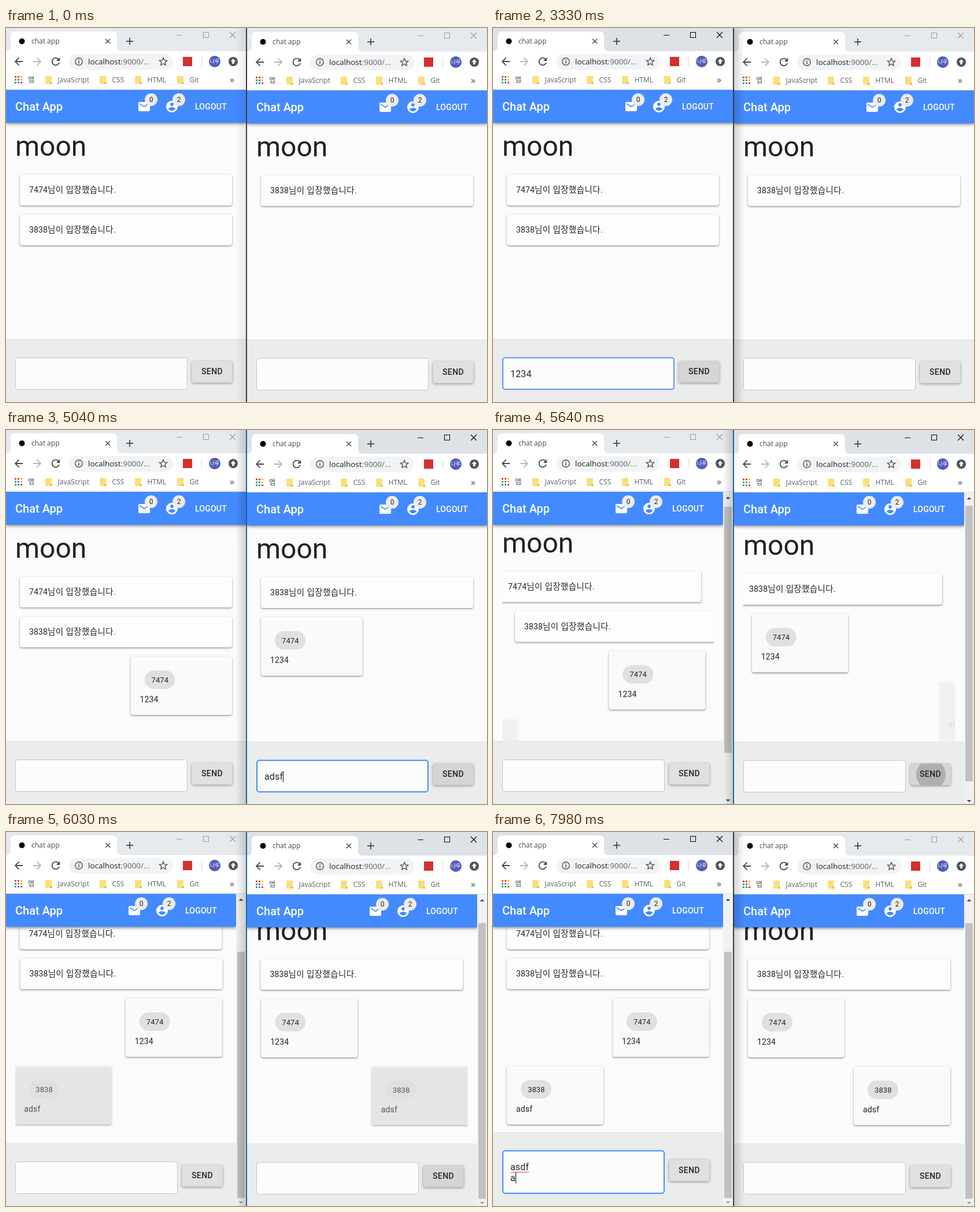
These frames come from a looping animation (832 px wide and 647 px high, 8000 ms). An HTML page with a canvas:

```html
<!DOCTYPE html>
<html lang="ko">
<head>
<meta charset="utf-8">
<title>chat app</title>
<style>
html, body { margin: 0; width: 100%; height: 100%; overflow: hidden; background: #fbfbfb; }
canvas { display: block; width: 832px; height: 647px; }
</style>
</head>
<body>
<canvas id="stage" width="832" height="647"></canvas>
<script>
const ctx = document.getElementById('stage').getContext('2d');
const LOOP = 8000;
const WIN_W = 415, BOTTOM = 647;
const UI = '"Open Sans", "Noto Sans CJK KR", "Noto Sans CJK JP", "Noto Sans CJK", sans-serif';
const APP = 'Roboto, "Noto Sans CJK KR", "Noto Sans CJK JP", "Noto Sans CJK", sans-serif';
const INK = '#242424', BLUE = [68, 138, 255], GREY = [196, 196, 196], DARK = [33, 33, 33];
const ANNA = '7474', BEN = '3838';

const ICON = {
  mail: new Path2D('M20 4H4c-1.1 0-1.99.9-1.99 2L2 18c0 1.1.9 2 2 2h16c1.1 0 2-.9 2-2V6c0-1.1-.9-2-2-2zm0 4l-8 5-8-5V6l8 5 8-5v2z'),
  user: new Path2D('M12 2C6.48 2 2 6.48 2 12s4.48 10 10 10 10-4.48 10-10S17.52 2 12 2zm0 3c1.66 0 3 1.34 3 3s-1.34 3-3 3-3-1.34-3-3 1.34-3 3-3zm0 14.2c-2.5 0-4.71-1.28-6-3.22.03-1.99 4-3.08 6-3.08 1.99 0 5.97 1.09 6 3.08-1.29 1.94-3.5 3.22-6 3.22z'),
  back: new Path2D('M20 11H7.83l5.59-5.59L12 4l-8 8 8 8 1.41-1.41L7.83 13H20v-2z'),
  reload: new Path2D('M17.65 6.35C16.2 4.9 14.21 4 12 4c-4.42 0-7.99 3.58-7.99 8s3.57 8 7.99 8c3.73 0 6.84-2.55 7.73-6h-2.08c-.82 2.33-3.04 4-5.65 4-3.31 0-6-2.69-6-6s2.69-6 6-6c1.66 0 3.14.69 4.22 1.78L13 11h7V4l-2.35 2.35z')
};

const clamp = v => Math.max(0, Math.min(1, v));
const ramp = (t, start, span) => clamp((t - start) / span);
const pulse = (t, on, off, span) => ramp(t, on, span) - ramp(t, off, span);
const smooth = p => p * p * (3 - 2 * p);
const mix = (a, b, p) => a.map((v, i) => v + (b[i] - v) * p);
const rgb = c => `rgb(${c.map(Math.round)})`;
const within = (t, spans) => spans.some(([a, b]) => t >= a && t < b);

function rect(x, y, w, h, color) {
  ctx.fillStyle = color;
  ctx.fillRect(x, y, w, h);
}
function round(x, y, w, h, r, color) {
  ctx.beginPath();
  ctx.roundRect(x, y, w, h, r);
  if (color) { ctx.fillStyle = color; ctx.fill(); }
}
function disc(x, y, r, color) {
  ctx.beginPath();
  ctx.arc(x, y, r, 0, 7);
  ctx.fillStyle = color;
  ctx.fill();
}
function poly(points, color, width) {
  ctx.beginPath();
  points.forEach(([x, y]) => ctx.lineTo(x, y));
  if (width) { ctx.strokeStyle = color; ctx.lineWidth = width; ctx.stroke(); }
  else { ctx.fillStyle = color; ctx.fill(); }
}
function text(str, x, y, font, color, gap = 0, align = 'left') {
  ctx.font = font;
  ctx.fillStyle = color;
  ctx.letterSpacing = gap + 'px';
  ctx.textAlign = align;
  ctx.fillText(str, x, y);
  return ctx.measureText(str).width;
}
function icon(path, x, y, color, scale = 1) {
  ctx.save();
  ctx.translate(x, y);
  ctx.scale(scale, scale);
  ctx.translate(-12, -12);
  ctx.fillStyle = color;
  ctx.fill(path);
  ctx.restore();
}
function raised(x, y, w, h, color, blur, alpha) {
  ctx.save();
  ctx.shadowColor = `rgba(0,0,0,${alpha})`;
  ctx.shadowBlur = blur;
  ctx.shadowOffsetY = 1.3;
  round(x, y, w, h, 4, color);
  ctx.restore();
}

function titleBar(active) {
  rect(0, 0, WIN_W, 40, active ? '#dee1e6' : '#e7eaed');
  ctx.beginPath();
  ctx.moveTo(0, 40);
  ctx.quadraticCurveTo(8, 40, 8, 32);
  ctx.lineTo(8, 14);
  ctx.quadraticCurveTo(8, 6, 16, 6);
  ctx.lineTo(184, 6);
  ctx.quadraticCurveTo(192, 6, 192, 14);
  ctx.lineTo(192, 32);
  ctx.quadraticCurveTo(192, 40, 200, 40);
  ctx.fillStyle = '#fff';
  ctx.fill();
  disc(27.5, 23, 5, '#000');
  text('chat app', 44, 27, '12px ' + UI, '#45494d');
  poly([[172, 19], [180, 27]], '#45494d', 1.5);
  poly([[180, 19], [172, 27]], '#45494d', 1.5);
  poly([[208, 23], [220, 23]], '#45494d', 1.8);
  poly([[214, 17], [214, 29]], '#45494d', 1.8);
  const c = active ? '#000' : '#999';
  rect(295, 12, 10, 1, c);
  ctx.strokeStyle = c;
  ctx.lineWidth = 1;
  ctx.strokeRect(341.5, 7.5, 9, 9);
  poly([[387, 7], [397, 17]], c, 1.1);
  poly([[397, 7], [387, 17]], c, 1.1);
}

function toolbar() {
  rect(0, 40, WIN_W, 67, '#fff');
  icon(ICON.back, 22, 58, '#45494d', .9);
  icon(ICON.back, 54, 58, '#b4b6b8', -.9);
  icon(ICON.reload, 86, 58, '#45494d', .9);
  round(109, 45, 180, 27, 13.5, '#f1f3f4');
  ctx.beginPath();
  ctx.arc(126, 58, 6.2, 0, 7);
  ctx.strokeStyle = '#4d5155';
  ctx.lineWidth = 1.4;
  ctx.stroke();
  rect(125.2, 57, 1.6, 4.5, '#4d5155');
  rect(125.2, 54.2, 1.6, 1.6, '#4d5155');
  const font = '13.5px ' + UI;
  const w = text('localhost', 142, 63, font, '#202124');
  text(':9000/...', 142 + w, 63, font, '#5f6368');

  const star = [];
  for (let i = 0; i < 12; i++) {
    const r = i % 2 ? 3.2 : 7, a = i * Math.PI / 5 - Math.PI / 2;
    star.push([272 + r * Math.cos(a), 58.5 + r * Math.sin(a)]);
  }
  poly(star, '#4d5155', 1.4);
  rect(306, 50, 16, 16, '#d3302f');
  rect(338, 50, 1, 16, '#d5d7da');
  disc(361, 58, 10, '#505cb8');
  text('나루', 361, 61, '9px ' + UI, '#fff', 0, 'center');
  disc(393, 58, 8, '#505357');
  poly([[393, 53], [397.5, 58], [394.8, 58], [394.8, 62], [391.2, 62], [391.2, 58], [388.5, 58]], '#fff');

  const dots = ['#ea4335', '#ea4335', '#fbbc04', '#34a853', '#4285f4', '#fbbc04', '#34a853', '#4285f4', '#ea4335'];
  dots.forEach((c, i) => rect(15 + i % 3 * 5, 83 + Math.floor(i / 3) * 5, 3, 3, c));
  text('앱', 38, 94, '12px ' + UI, '#45494d');
  [['JavaScript', 67], ['CSS', 161], ['HTML', 222], ['Git', 295]].forEach(([name, x]) => {
    round(x + 1, 83, 11, 14, 1, '#fbdf7b');
    rect(x + 9, 94, 4, 3, '#e8bf45');
    text(name, x + 22.5, 94, '12px ' + UI, '#5a5e62');
  });
  text('»', 387, 95, '16px ' + UI, '#45494d');
  rect(0, 106, WIN_W, 1, '#dadce0');
}

function appBar(w) {
  ctx.save();
  ctx.shadowColor = 'rgba(0,0,0,.45)';
  ctx.shadowBlur = 5;
  ctx.shadowOffsetY = 2;
  rect(0, 107, w, 57, rgb(BLUE));
  ctx.restore();
  text('Chat App', 16, 143, '500 20px ' + APP, '#fff');
  const x = w - WIN_W;
  icon(ICON.mail, x + 239, 136, '#fff');
  icon(ICON.user, x + 287, 136, '#fff');
  [['0', 251], ['2', 299]].forEach(([n, bx]) => {
    disc(x + bx, 124, 11, '#ececec');
    text(n, x + bx, 128.3, '12px ' + APP, INK, 0, 'center');
  });
  text('LOGOUT', x + 327, 141, '500 14px ' + APP, '#fff', .2);
}

function notice(x, y, w, name) {
  raised(x, y, w, 53.5, '#fdfdfd', 3, .45);
  const n = text(name, x + 16, y + 31.5, '14px ' + APP, INK, .15);
  text('님이 입장했습니다.', x + 16 + n, y + 31.5, '14.5px ' + APP, INK, .4);
}
function message(x, y, w, name, body) {
  raised(x, y, w, 101.5, '#fafafa', 3, .45);
  round(x + 24, y + 24.5, 53, 32, 16, '#e0e0e0');
  text(name, x + 36, y + 45, '13px ' + APP, INK, .1);
  text(body, x + 16, y + 79.5, '14px ' + APP, INK, .15);
}

function feed(t, win, w, scroll) {
  const inner = w - 48, half = inner / 2 - 8;
  text('moon', 16, 221 - scroll, '48px ' + APP, '#212121');
  ctx.save();
  ctx.beginPath();
  ctx.rect(16, 107, w - 32, BOTTOM);
  ctx.clip();
  let y = 253.5 - scroll;
  win.cards.forEach((card, i) => {
    const isNote = !card.body;
    const cw = isNote ? inner : half;
    const height = isNote ? 69 : 117;
    if (t < card.at) return;
    let shift = 0, alpha = 1;
    const p = ramp(t, card.at, 600);
    if (!isNote && p < 1) {
      shift = (card.own ? 1 : -1) * Math.pow(1 - p, 2.2) * 1.12;
      shift = Math.max(-1, Math.min(1, shift));
      alpha = p;
    } else {
      // older cards get a short nudge whenever a new one arrives
      const q = ramp(t, 5580, 600);
      shift = (i % 2 ? 1 : -1) * .052 * Math.min(1, q * 10) * Math.pow(1 - q, 2.5);
    }
    const x = 24 + (card.own ? half + 16 : 0) + shift * cw;
    ctx.globalAlpha = alpha;
    if (isNote) notice(x, y, cw, card.name);
    else message(x, y, cw, card.name, card.body);
    ctx.globalAlpha = 1;
    y += height;
  });
  ctx.restore();
}

function typed(t, win) {
  const run = win.typing.find(r => t >= r.focus && t < r.clear);
  if (!run) return { lines: [''], caret: false };
  const keys = run.keys.filter(k => t >= k);
  const last = keys.length ? keys[keys.length - 1] : run.focus;
  return {
    lines: run.text.slice(0, keys.length).split('\n'),
    caret: t < run.blur && Math.floor((t - last) / 510) % 2 === 0
  };
}

function composer(t, win, w) {
  const { lines, caret } = typed(t, win);
  const grow = (lines.length - 1) * 19;
  rect(0, 538 - grow, w, BOTTOM, '#ebecec');
  rect(0, 538 - grow, w, 1, '#e4e5e5');

  const focus = win.typing.reduce((s, r) => s + ramp(t, r.focus, 150) - ramp(t, r.blur - 30, 150), 0);
  const hover = win.hover.reduce((s, [a, b]) => s + pulse(t, a, b, 120), 0);
  const thick = focus > 0 ? 2 : 1;
  const top = 570 - grow;
  round(16 + thick / 2, top + thick / 2 - (thick > 1 ? .5 : 0), w - 117 - thick, 56 + grow - thick + (thick > 1 ? .5 : 0), 4, '#fcfcfc');
  ctx.strokeStyle = rgb(mix(mix(GREY, DARK, clamp(hover)), BLUE, clamp(focus)));
  ctx.lineWidth = thick;
  ctx.stroke();

  let width = 0;
  lines.forEach((line, i) => {
    const base = 604 - grow + i * 19;
    width = text(line, 30, base, '16px ' + APP, INK, .15);
    if (i < lines.length - 1) {
      const wave = [];
      for (let x = 0; x <= width; x += 2) wave.push([30 + x, base + 3 + x % 4 / 2]);
      poly(wave, '#e53935', 1);
    }
  });
  if (caret) rect(Math.round(30 + width), 589, 1, 19, '#000');

  const bx = w - 93.5, by = 576 - grow / 2;
  const press = pulse(t, win.send[0], win.send[1], 90);
  raised(bx, by, 70, 37.5, rgb(mix([224, 224, 224], [213, 213, 213], press)), 4, .4);
  const age = t - win.click;
  if (age > 0 && age < 620) {
    ctx.save();
    round(bx, by, 70, 37.5, 4);
    ctx.clip();
    disc(bx + 36, by + 19, 42 * smooth(clamp(age / 420)), `rgba(0,0,0,${.24 * (1 - ramp(age, 120, 500))})`);
    ctx.restore();
  }
  text('SEND', bx + 16.5, by + 23, '500 14px ' + APP, INK, .4);
}

function scrollbar(x, scroll, max, size, slope) {
  rect(x, 107, 17, BOTTOM - 107, '#f1f1f1');
  rect(x + 2, 125 + scroll * slope, 13, size, '#c1c1c1');
  const up = scroll > 0 ? '#505050' : '#a3a3a3', down = scroll < max ? '#505050' : '#a3a3a3';
  poly([[x + 4.5, 119], [x + 8.5, 115], [x + 12.5, 119]], up);
  poly([[x + 4.5, 639], [x + 8.5, 643], [x + 12.5, 639]], down);
}

function drawWindow(t, win) {
  const w = t >= 5580 ? 398 : WIN_W;
  const scroll = win.scroll * smooth(ramp(t, 5580, win.scrollTime));
  ctx.save();
  ctx.translate(win.x, win.y);
  ctx.beginPath();
  ctx.rect(0, 0, WIN_W, BOTTOM);
  ctx.clip();
  rect(0, 0, WIN_W, BOTTOM, '#fbfbfb');
  feed(t, win, w, scroll);
  composer(t, win, w);
  appBar(w);
  if (w < WIN_W) scrollbar(w, scroll, win.scroll, win.thumb, win.slope);
  titleBar(within(t, win.active));
  toolbar();
  ctx.restore();
}

const left = {
  x: 0, y: 0,
  active: [[1440, 4020], [6660, LOOP]],
  hover: [[1170, 2950], [6390, LOOP]],
  typing: [
    { text: '1234', keys: [2400, 2520, 2610, 2820], focus: 1440, blur: 3330, clear: 3510 },
    { text: 'asdf\na', keys: [7410, 7470, 7500, 7560, 7830, 7980], focus: 6660, blur: 9000, clear: 9000 }
  ],
  send: [3090, 3750], click: 3330,
  scroll: 104, scrollTime: 330, thumb: 426, slope: .79,
  cards: [
    { name: ANNA, at: 0 },
    { name: BEN, at: 0 },
    { name: ANNA, body: '1234', own: true, at: 3510 },
    { name: BEN, body: 'adsf', at: 5580 }
  ]
};
const right = {
  x: 417, y: 1,
  active: [[4020, 6660]],
  hover: [[3870, 4860]],
  typing: [{ text: 'adsf', keys: [4620, 4770, 4830, 4890], focus: 4140, blur: 5400, clear: 5580 }],
  send: [4950, 6240], click: 5400,
  scroll: 35, scrollTime: 240, thumb: 477, slope: .9,
  cards: [
    { name: BEN, at: 0 },
    { name: ANNA, body: '1234', at: 3510 },
    { name: BEN, body: 'adsf', own: true, at: 5580 }
  ]
};

function edge(t) {
  const leftOn = within(t, left.active), rightOn = within(t, right.active);
  const from = leftOn ? 417 : 415, to = leftOn ? 435 : 397;
  const shade = ctx.createLinearGradient(from, 0, to, 0);
  shade.addColorStop(0, `rgba(0,0,0,${leftOn || rightOn ? .16 : .08})`);
  shade.addColorStop(1, 'rgba(0,0,0,0)');
  rect(Math.min(from, to), 0, 18, BOTTOM, shade);
  rect(417, 0, WIN_W, 1, rightOn ? '#dee1e6' : '#e7eaed');
  rect(415, 0, 2, BOTTOM, rightOn ? '#1468a8' : '#3a3a3a');
}

function frame(now) {
  const t = now % LOOP;
  drawWindow(t, left);
  drawWindow(t, right);
  edge(t);
}

const begin = performance.now();
function tick() {
  frame(performance.now() - begin);
  requestAnimationFrame(tick);
}
tick();
</script>
</body>
</html>
```
